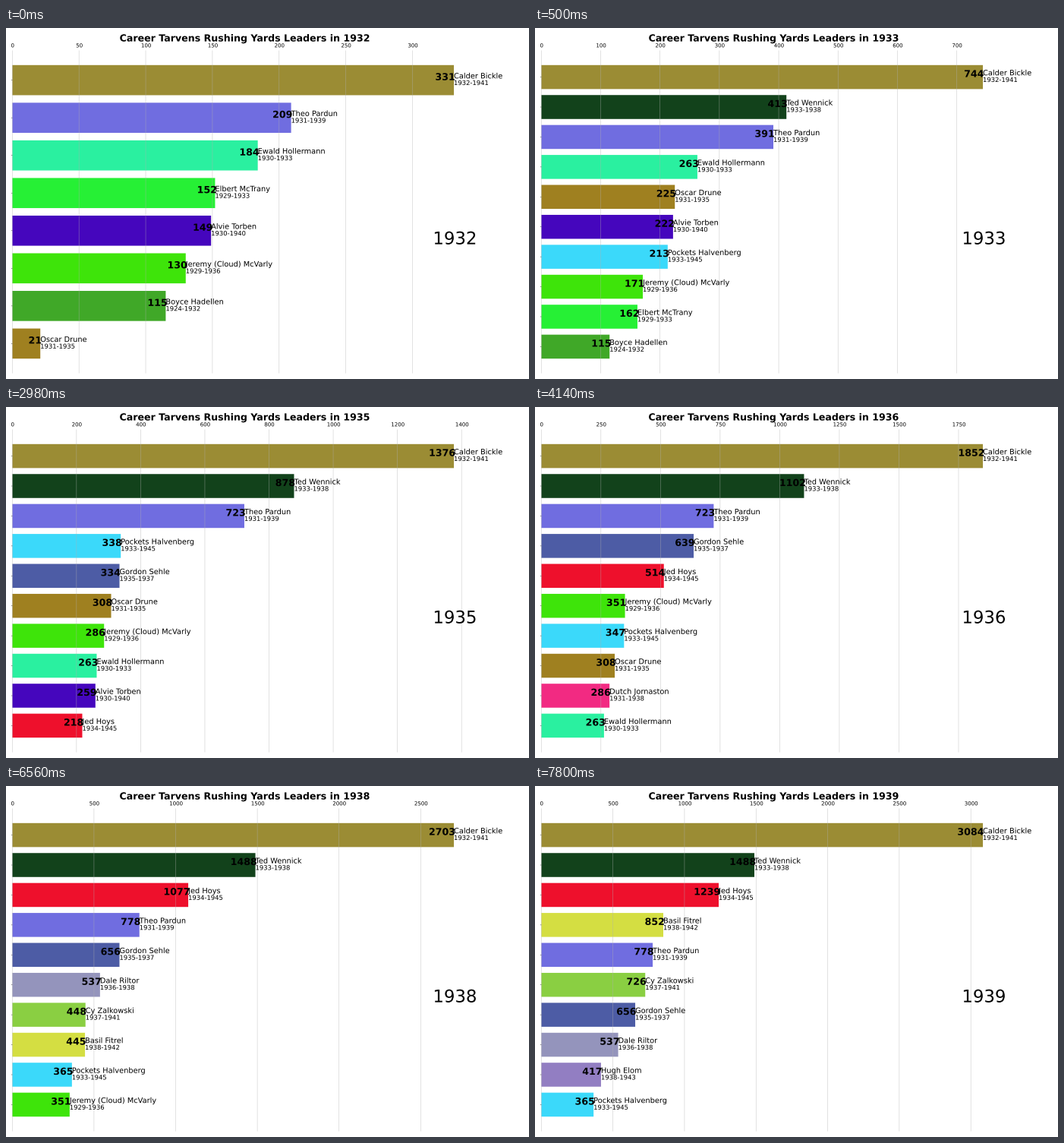
Animation, 689 px wide and 462 px high, one loop 8000 ms. Source, as a matplotlib script:

```python
import matplotlib.pyplot as plt
from matplotlib.animation import FuncAnimation
from matplotlib.patches import PathPatch, Rectangle
from matplotlib.textpath import TextPath
from matplotlib.ticker import MaxNLocator
from matplotlib.transforms import Affine2D

W, H, DPI = 689, 462, 64
LEFT, RIGHT, TOP, BOTTOM = 8.3, 619.1, 29.5, 454.5
STEP_MS, LOOP_MS = 20, 8000
BAR_HEIGHT, MARGIN = 0.8, 0.05

# key: (full name, career span, bar colour)
PLAYERS = {
    "Bickle": ("Calder Bickle", "1932-1941", "#9b8c34"),
    "Pardun": ("Theo Pardun", "1931-1939", "#706de0"),
    "Hollermann": ("Ewald Hollermann", "1930-1933", "#2af0a0"),
    "McTrany": ("Elbert McTrany", "1929-1933", "#26f035"),
    "Torben": ("Alvie Torben", "1930-1940", "#4506bd"),
    "McVarly": ("Jeremy (Cloud) McVarly", "1929-1936", "#3ee40a"),
    "Hadellen": ("Boyce Hadellen", "1924-1932", "#40a828"),
    "Drune": ("Oscar Drune", "1931-1935", "#9f8020"),
    "Wennick": ("Ted Wennick", "1933-1938", "#12421b"),
    "Halvenberg": ("Pockets Halvenberg", "1933-1945", "#3bd9fa"),
    "Hoys": ("Jed Hoys", "1934-1945", "#ee102c"),
    "Sehle": ("Gordon Sehle", "1935-1937", "#4d5ca5"),
    "Jornaston": ("Dutch Jornaston", "1931-1938", "#f22a82"),
    "Riltor": ("Dale Riltor", "1936-1938", "#9494bc"),
    "Zalkowski": ("Cy Zalkowski", "1937-1941", "#8acf42"),
    "Fitrel": ("Basil Fitrel", "1938-1942", "#d4de42"),
    "Elom": ("Hugh Elom", "1938-1943", "#927ec2"),
}

# (start in ms, year, yards by player)
SEASONS = [
    (0, 1932, dict(Bickle=331, Pardun=209, Hollermann=184, McTrany=152,
                   Torben=149, McVarly=130, Hadellen=115, Drune=21)),
    (500, 1933, dict(Bickle=744, Wennick=413, Pardun=391, Hollermann=263,
                     Drune=225, Torben=222, Halvenberg=213, McVarly=171,
                     McTrany=162, Hadellen=115)),
    (1740, 1934, dict(Bickle=1103, Pardun=565, Wennick=542, Drune=287,
                      Halvenberg=286, Hollermann=263, Torben=259,
                      McVarly=171, McTrany=162, Hoys=155)),
    (2980, 1935, dict(Bickle=1376, Wennick=878, Pardun=723, Halvenberg=338,
                      Sehle=334, Drune=308, McVarly=286, Hollermann=263,
                      Torben=259, Hoys=218)),
    (4140, 1936, dict(Bickle=1852, Wennick=1102, Pardun=723, Sehle=639,
                      Hoys=514, McVarly=351, Halvenberg=347, Drune=308,
                      Jornaston=286, Hollermann=263)),
    (5380, 1937, dict(Bickle=2404, Wennick=1263, Hoys=824, Pardun=772,
                      Sehle=656, Riltor=489, Halvenberg=365, McVarly=351,
                      Zalkowski=324, Drune=308)),
    (6560, 1938, dict(Bickle=2703, Wennick=1488, Hoys=1077, Pardun=778,
                      Sehle=656, Riltor=537, Zalkowski=448, Fitrel=445,
                      Halvenberg=365, McVarly=351)),
    (7800, 1939, dict(Bickle=3084, Wennick=1488, Hoys=1239, Fitrel=852,
                      Pardun=778, Zalkowski=726, Sehle=656, Riltor=537,
                      Elom=417, Halvenberg=365)),
]

fig = plt.figure(figsize=(W / DPI, H / DPI), dpi=DPI, facecolor="white")


def pt(pixels):
    return pixels * 72 / DPI


def write(ax, x, y, text, size, align=0, weight="normal"):
    """Draw text as outlines, baseline at y; align 0 left, 0.5 centre, 1 right."""
    glyphs = TextPath((0, 0), str(text), size=size,
                      prop=dict(family="DejaVu Sans", weight=weight))
    shift = align * glyphs.get_extents().width
    place = Affine2D().scale(1, -1).translate(x - shift, y)
    ax.add_patch(PathPatch(place.transform_path(glyphs), facecolor="black",
                           linewidth=0, snap=False, zorder=4))


def rule(ax, xs, ys, color, alpha=1):
    ax.plot(xs, ys, color=color, alpha=alpha, linewidth=pt(0.56),
            solid_capstyle="butt", snap=False, zorder=2)


def build_chart(year, yards):
    """One season on an axes measured in stage pixels, y downwards."""
    ax = fig.add_axes([0, 0, 1, 1], label=str(year), autoscale_on=False,
                      xlim=(0, W), ylim=(H, 0), visible=False)
    ax.axis("off")

    ranked = sorted(yards.items(), key=lambda item: -item[1])
    x_limit = ranked[0][1] * (1 + MARGIN)
    scale = (RIGHT - LEFT) / x_limit
    bars_span = len(ranked) - 1 + BAR_HEIGHT
    pitch = (BOTTOM - TOP) / (1 + 2 * MARGIN) / bars_span
    first = TOP + pitch * (MARGIN * bars_span + BAR_HEIGHT / 2)

    for row, (key, value) in enumerate(ranked):
        name, span, color = PLAYERS[key]
        y, end = first + row * pitch, LEFT + value * scale
        height = BAR_HEIGHT * pitch
        ax.add_patch(Rectangle((LEFT, y - height / 2), end - LEFT, height,
                               facecolor=color, linewidth=0, snap=False))
        rule(ax, (LEFT - 1.1, LEFT), (y, y), "black")
        write(ax, end, y, value, 12.6, align=1, weight="bold")
        write(ax, end, y - 2.3, name, 9.8)
        write(ax, end, y + 6.4, span, 8.4)

    locator = MaxNLocator(9, steps=[1, 2, 2.5, 5, 10])
    for tick in locator.tick_values(0, x_limit):
        if tick <= x_limit:
            x = LEFT + tick * scale
            rule(ax, (x, x), (TOP, BOTTOM), "#b0b0b0", alpha=0.65)
            write(ax, x, 25.4, f"{tick:.0f}", 7, align=0.5)

    write(ax, (LEFT + RIGHT) / 2, 17.6,
          f"Career Tarvens Rushing Yards Leaders in {year}", 12.6,
          align=0.5, weight="bold")
    write(ax, 562.4, 284.6, year, 22.8)
    return ax


charts = [build_chart(year, yards) for _, year, yards in SEASONS]


def update(frame):
    now = frame * STEP_MS
    current = sum(start <= now for start, _, _ in SEASONS) - 1
    for i, ax in enumerate(charts):
        ax.set_visible(i == current)
    return charts


anim = FuncAnimation(fig, update, frames=LOOP_MS // STEP_MS,
                     init_func=lambda: update(0), interval=STEP_MS,
                     repeat=True, repeat_delay=0, blit=False)
plt.show()
```
